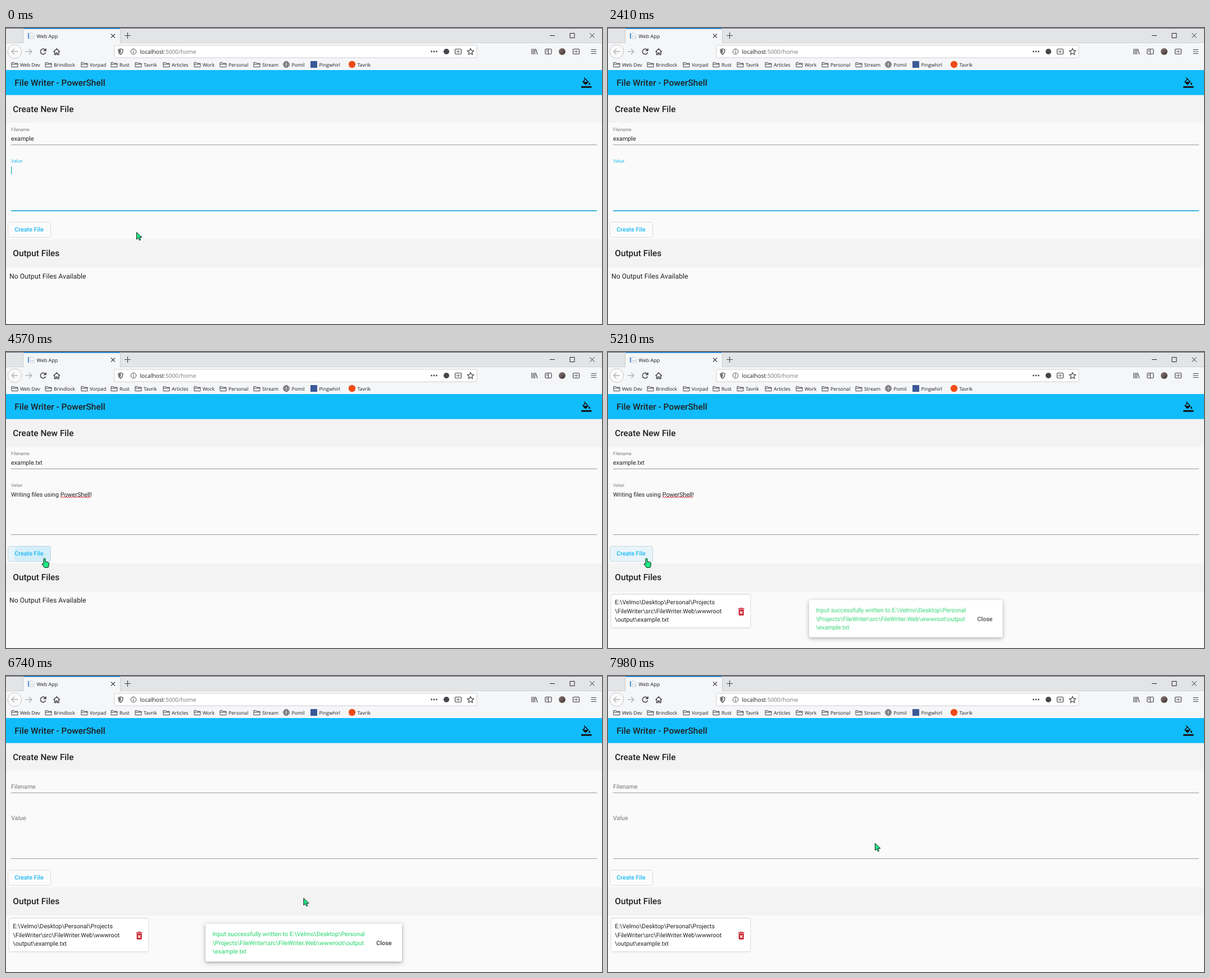
These frames come from a looping animation (1061x528 px, 8 s). An HTML page:

```html
<!DOCTYPE html>
<html lang="en">
<head>
<meta charset="utf-8">
<title>File Writer</title>
<style>
html, body { margin: 0; width: 100%; height: 100%; overflow: hidden; background: #fafafa; }
svg { display: block; width: 100vw; height: 100vh; }
text { font: 10.75px Roboto, sans-serif; fill: #212121; white-space: pre; text-rendering: geometricPrecision; }
.chrome text { font: 8.7px "Open Sans", "Noto Sans", sans-serif; fill: #1c1c20; }
.chrome .tab { font-size: 9px; }
.chrome .url { font-size: 10.2px; }
.h { font-size: 15.4px; font-weight: 500; }
.bold { font-weight: 500; }
.line { fill: none; stroke: #45454b; stroke-width: 1.2; }
.ink { fill: #45454b; }
.label { fill: #777; }
.paper { fill: #fff; filter: drop-shadow(0 .7px .5px rgba(0,0,0,.25)) drop-shadow(0 .7px 1.4px rgba(0,0,0,.22)); }
#snack .paper { filter: drop-shadow(0 1.8px 1.6px rgba(0,0,0,.2)) drop-shadow(0 2px 4.5px rgba(0,0,0,.26)); }
#snack .msg text { fill: #22d568; }

/* One 8 s clock: 1% = 80 ms */
.loop { animation: 8s infinite; }
.step { animation: 8s step-end infinite; }

#caret { animation-name: caret; }
@keyframes caret {
  0%, 10%, 23.375% { opacity: 1; transform: none; }
  3.375%, 16.75%, 30.125% { opacity: 0; transform: none; }
  35.875%, 43% { opacity: 1; transform: translateX(144px); }
  42.125%, 49.7%, 100% { opacity: 0; transform: translateX(144px); }
}
#value { animation-name: value; }
@keyframes value { 0% { opacity: 0 } 35.875% { opacity: 1 } 65.5% { opacity: 0 } }
#name { animation-name: name; }
@keyframes name { 0% { opacity: 1 } 55% { opacity: 0 } }
#fullname { animation-name: fullname; }
@keyframes fullname { 0% { opacity: 0 } 55% { opacity: 1 } 65.5% { opacity: 0 } }

#focus { animation-name: focus; }
@keyframes focus { 0%, 55% { opacity: 1 } 56.6%, 100% { opacity: 0 } }
#valueLabel { animation-name: tint; }
@keyframes tint { 0%, 55% { fill: #1cbcf4 } 56.6%, 100% { fill: #777 } }
.float { animation-name: drop; }
@keyframes drop {
  0%, 65.5% { transform: translateY(-16.6px) scale(.75); animation-timing-function: cubic-bezier(.4,0,.2,1); }
  67.4%, 100% { transform: none; }
}

#tone { animation-name: tone; }
@keyframes tone { 0%, 55.7% { opacity: 0 } 56%, 67.5% { opacity: .08 } 69%, 100% { opacity: 0 } }
#ripple { animation-name: ripple, rippleFade; }
@keyframes ripple {
  0%, 56% { transform: translate(68px,368px) scale(23); animation-timing-function: cubic-bezier(.4,0,.2,1); }
  58.8%, 100% { transform: translate(41px,360px) scale(45); }
}
@keyframes rippleFade { 0%, 56% { opacity: 0 } 56.9%, 59% { opacity: .09 } 61%, 100% { opacity: 0 } }

#empty { animation-name: empty; }
@keyframes empty { 0% { opacity: 1 } 63.75% { opacity: 0 } }
#card { animation-name: card; }
@keyframes card { 0% { opacity: 0 } 63.75% { opacity: 1 } }
#snack { animation-name: snack; transform-origin: 530px 475px; }
@keyframes snack {
  0%, 63.9% { opacity: 0; transform: scale(.8); animation-timing-function: cubic-bezier(0,0,.2,1); }
  65.8%, 92.9% { opacity: 1; transform: none; }
  93.8%, 100% { opacity: 0; transform: none; }
}
#closeTone { animation-name: closeTone; }
@keyframes closeTone { 0%, 91.3% { opacity: 0 } 91.5%, 100% { opacity: .045 } }
#closeRipple { animation-name: closeRipple, closeFade; }
@keyframes closeRipple {
  0%, 91.44% { transform: translate(685px,478px) scale(15); animation-timing-function: cubic-bezier(.4,0,.2,1); }
  94.25%, 100% { transform: translate(673px,475.5px) scale(34); }
}
@keyframes closeFade { 0%, 91.4% { opacity: 0 } 92.1%, 100% { opacity: .09 } }

#cursor { animation-name: move; }
@keyframes move {
  0%, 46.3% { transform: translate(232px,364px); }
  46.375% { transform: translate(209px,367px); animation-timing-function: ease-in; }
  51% { transform: translate(135px,372px); animation-timing-function: ease-out; }
  55.5%, 67.25% { transform: translate(68px,368px); }
  69.75%, 72.625% { transform: translate(102px,364px); animation-timing-function: ease-in; }
  74.75% { transform: translate(138px,324px); animation-timing-function: linear; }
  75.5% { transform: translate(200px,321px); animation-timing-function: ease-out; }
  78.5%, 82.625% { transform: translate(507px,384px); animation-timing-function: ease-in-out; }
  89.25%, 93.4% { transform: translate(684px,478px); animation-timing-function: ease-in-out; }
  99.75%, 100% { transform: translate(475px,298px); }
}
#arrow { animation-name: arrow; }
@keyframes arrow {
  0%, 46.375%, 67.9%, 75.8%, 94.1% { opacity: 1 }
  24.25%, 54.4%, 74.5%, 88.25% { opacity: 0 }
  100% { opacity: 1 }
}
#hand { animation-name: hand; }
@keyframes hand { 0%, 67.9%, 94.1%, 100% { opacity: 0 } 54.4%, 88.25% { opacity: 1 } }
#beam { animation-name: beam; }
@keyframes beam { 0%, 75.8%, 100% { opacity: 0 } 74.5% { opacity: 1 } }
#cursor path { stroke-linejoin: round; }
</style>
</head>
<body>
<svg viewBox="0 0 1061 528">
  <defs>
    <clipPath id="buttonClip"><rect x="3" y="346" width="77" height="28" rx="3"/></clipPath>
    <clipPath id="closeClip"><rect x="647" y="461" width="51" height="29" rx="3"/></clipPath>
    <linearGradient id="avatar" x2="1" y2="1"><stop stop-color="#8b7773"/><stop offset="1" stop-color="#3b3436"/></linearGradient>
  </defs>
  <rect width="1061" height="528" fill="#fafafa"/>

  <g class="chrome">
    <rect width="1061" height="27" fill="#e3e4e6"/>
    <rect y="26" width="1061" height="1" fill="#cfd0d2"/>
    <rect y="27" width="1061" height="48" fill="#f5f6f7"/>
    <rect width="1061" height="1" fill="#56606a"/>
    <rect x="30" width="174" height="27" fill="#c9cacc"/>
    <rect x="31" width="172" height="28" fill="#f5f6f7"/>
    <rect x="31" width="172" height="1.600" fill="#0a75d1"/>
    <path d="M39 9h2v10h-2z" fill="#4b93d9"/>
    <path d="M43 9h4l3 3v7h-7z" fill="#fff" stroke="#b6bfc9" stroke-width=".8"/>
    <path d="M44.500 16l2-2 2 3" fill="none" stroke="#86aacc"/>
    <text class="tab" x="54.500" y="17.500">Web App</text>
    <path class="line" d="M187 10.500l7 7m0-7l-7 7M216.500 8v11M211 13.500h11"/>
    <path d="M968 13.500h9M1004 9.500h8v8h-8zM1039.500 9.500l8 8m0-8l-8 8" fill="none" stroke="#222"/>

    <circle cx="15.500" cy="42" r="12.300" fill="#fafafa" stroke="#c6c6c8"/>
    <g fill="none" stroke="#b2b2b5" stroke-width="1.400">
      <path d="M21 42H10m5-5l-5 5 5 5M35 42h11m-5-5l5 5-5 5"/>
    </g>
    <path class="line" style="stroke-width:1.600" d="M70 39.500a4.700 4.700 0 1 0 .5 4M71 36.500v4h-4"/>
    <path class="line" style="stroke-width:1.500" d="M84.500 42.500l5.700-5.500 5.700 5.500M86.500 41.500v6h2.500v-3h2.500v3h2.500v-6"/>
    <rect x="193" y="31" width="645" height="22" rx="1.500" fill="#fff" stroke="#cfcfd2"/>
    <path class="line" d="M204 37.200l4 1.300q.3 6-4 8.800-4.300-2.800-4-8.800z"/>
    <path class="ink" d="M204 38.500l-2.800.9q0 4 2.800 6.300z"/>
    <circle class="line" style="stroke-width:1" cx="227" cy="42" r="4.700"/>
    <path class="line" d="M227 41.500v3M227 39v1.200"/>
    <text class="url" x="238.500" y="46.300">localhost<tspan fill="#77777c">:5000/home</tspan></text>
    <g class="ink"><circle cx="757.500" cy="42" r="1.400"/><circle cx="762" cy="42" r="1.400"/><circle cx="766.500" cy="42" r="1.400"/></g>
    <circle class="ink" cx="784" cy="42" r="5"/>
    <path class="line" d="M827 36.500l1.700 3.600 3.900.5-2.900 2.700.8 3.900-3.500-2-3.500 2 .8-3.900-2.900-2.700 3.900-.5z"/>
    <path class="line" d="M936 37v10M938.700 37v10M941.400 37v10M943 37.500l3 9.500"/>
    <rect class="line" x="960" y="37.500" width="11" height="9" rx="1.500"/><path class="line" d="M965.500 38v8M962 40h2M962 42h2"/>
    <circle cx="990" cy="42" r="6" fill="url(#avatar)"/>
    <path class="line" d="M1041.500 38.500h9.500M1041.500 42h9.500M1041.500 45.500h9.500"/>
    <g id="bookmarks"></g>
  </g>

  <path d="M0 119.500h1061V169H0zM0 377h1061v50H0z" fill="#f3f3f3"/>
  <rect y="75" width="1061" height="44.600" fill="#11bcfb"/>
  <text class="h" x="15.300" y="102.600" style="font-size:15.500px">File Writer - PowerShell</text>
  <path transform="translate(1024 88.300) scale(.767)" fill="#111" d="M16.560 8.940L7.620 0 6.210 1.410l2.380 2.380-5.150 5.150c-.59.59-.59 1.540 0 2.120l5.500 5.500c.59.59 1.530.59 2.120 0l5.500-5.500c.59-.58.59-1.530 0-2.120zM5.210 10L10 5.210 14.790 10zM19 11.500s-2 2.170-2 3.500a2 2 0 0 0 4 0c0-1.330-2-3.500-2-3.500zM0 20h24v4H0z"/>
  <text class="h" x="12.300" y="150">Create New File</text>
  <text class="h" x="12.300" y="407.200">Output Files</text>

  <g transform="translate(9 201)"><text class="label loop float">Filename</text></g>
  <text id="name" class="step" x="9" y="201">example</text>
  <text id="fullname" class="step" x="9" y="201">example.txt</text>
  <path d="M9 208h1043v1H9zM9 325.300h1043v1H9z" fill="#969696"/>
  <g transform="translate(9 257)"><g class="loop float"><text id="valueLabel" class="loop">Value</text></g></g>
  <g id="value" class="step">
    <text x="9" y="257.500">Writing files using PowerShell!</text>
    <path id="squiggle" fill="none" stroke="#e0202c"/>
  </g>
  <rect id="focus" class="loop" x="9" y="325.200" width="1043" height="1.600" fill="#1eaee3"/>
  <rect id="caret" class="step" x="9" y="247" width="1.200" height="14" fill="#25a9a9"/>

  <rect x="3.500" y="346.500" width="76" height="27" rx="3" fill="#fbfbfb" stroke="#dcdcdc"/>
  <g clip-path="url(#buttonClip)" fill="#00a8f0">
    <rect id="tone" class="loop" x="3" y="346" width="77" height="28"/>
    <circle id="ripple" class="loop" r="1"/>
  </g>
  <text class="bold" x="15.300" y="363" style="fill:#1cb9f3">Create File</text>

  <text id="empty" class="step" x="6" y="447.200" style="font-size:12.270px">No Output Files Available</text>
  <g id="card" class="step">
    <rect class="paper" x="6" y="432.500" width="247" height="59" rx="2"/>
    <text x="12.300" y="450">E:\Velmo\Desktop\Personal\Projects</text>
    <text x="12.300" y="465.500">\FileWriter\src\FileWriter.Web\wwwroot</text>
    <text x="12.300" y="481">\output\example.txt</text>
    <path transform="translate(228 454) scale(.767)" fill="#cc2936" d="M6 19c0 1.100.9 2 2 2h8c1.100 0 2-.9 2-2V7H6zm2.460-7.120l1.410-1.410L12 12.590l2.120-2.120 1.410 1.410L13.410 14l2.120 2.120-1.410 1.410L12 15.410l-2.120 2.120-1.410-1.410L10.590 14zM15.500 4l-1-1h-5l-1 1H5v2h14V4z"/>
  </g>

  <g id="snack" class="loop">
    <rect class="paper" x="355" y="441.500" width="350" height="68" rx="3"/>
    <g class="msg">
      <text x="367.700" y="464">Input successfully written to E:\Velmo\Desktop\Personal</text>
      <text x="367.700" y="479.500">\Projects\FileWriter\src\FileWriter.Web\wwwroot\output</text>
      <text x="367.700" y="495">\example.txt</text>
    </g>
    <g clip-path="url(#closeClip)">
      <rect id="closeTone" class="loop" x="647" y="461" width="51" height="29"/>
      <circle id="closeRipple" class="loop" r="1"/>
    </g>
    <text class="bold" x="659.300" y="479.500" style="fill:#383838">Close</text>
  </g>

  <g id="cursor" class="loop">
    <path id="arrow" class="step" fill="#20e886" stroke="#10251a" d="M.5.500V13l3-2.600 2 4.400 2.200-1-2-4.300H10z"/>
    <path id="hand" class="step" fill="#20e886" stroke="#10251a" d="M-1 1.500a1.500 1.500 0 0 1 3 0v4.500l4.800 1q2 .6 1.900 2.600l-.6 3.900-1 3H.5l-4-5.200q-.8-1.700.5-2.100 1.100 0 2 1.200z"/>
    <g id="beam" class="step" fill="none">
      <path d="M-3.800-6h8.100M.25-6V6.500M-3.800 6.500h8.100" stroke="#17362a" stroke-width="2.600"/>
      <path d="M-3-6h6.500M.25-6V6.500M-3 6.500h6.500" stroke="#249562" stroke-width="1"/>
    </g>
  </g>
</svg>
<script>
const folder = '<path class="line" style="stroke-width:1" d="M.5 9.500v-8h4l1.300 1.500h5.700v6.500zM.5 4.500h11"/>';
const globe = '<g class="line" style="stroke-width:1"><circle cx="6" cy="5" r="5.300"/><ellipse cx="6" cy="5" rx="2.500" ry="5.300"/><path d="M.7 5h10.600M1.500 2.500h9M1.500 7.500h9"/></g>';
const square = '<rect y="-1" width="12" height="12" fill="#3b5998"/>';
const disc = '<circle cx="6" cy="5" r="6.200" fill="#f04b16"/>';
const bookmarks = [
  [25, "Web Dev"], [85, "Brindlock"], [149, "Vorpad"], [202, "Rust"], [245, "Tavrik"],
  [295, "Articles"], [350, "Work"], [396, "Personal"], [456, "Stream"],
  [508.5, "Pomil", globe], [557.5, "Pingwhirl", square], [625.5, "Tavrik", disc],
];
document.getElementById("bookmarks").innerHTML = bookmarks.map(([x, name, icon = folder]) =>
  `<g transform="translate(${x - 15.5} 60)">${icon}</g><text x="${x}" y="68.500">${name}</text>`).join("");

// Split-pane glyph used in the address bar and the toolbar
const pane = x => `<g class="line" transform="translate(${x} 37)"><rect x=".5" y=".5" width="11" height="9" rx="1.500"/><path d="M6 2.500v5M2.500 5h2M7.500 5h2"/></g>`;
document.querySelector(".chrome").insertAdjacentHTML("beforeend", pane(799) + pane(1009));

document.getElementById("squiggle").setAttribute("d", "M97 260" + "l2-2 2 2".repeat(13) + "l2-2");
</script>
</body>
</html>
```
